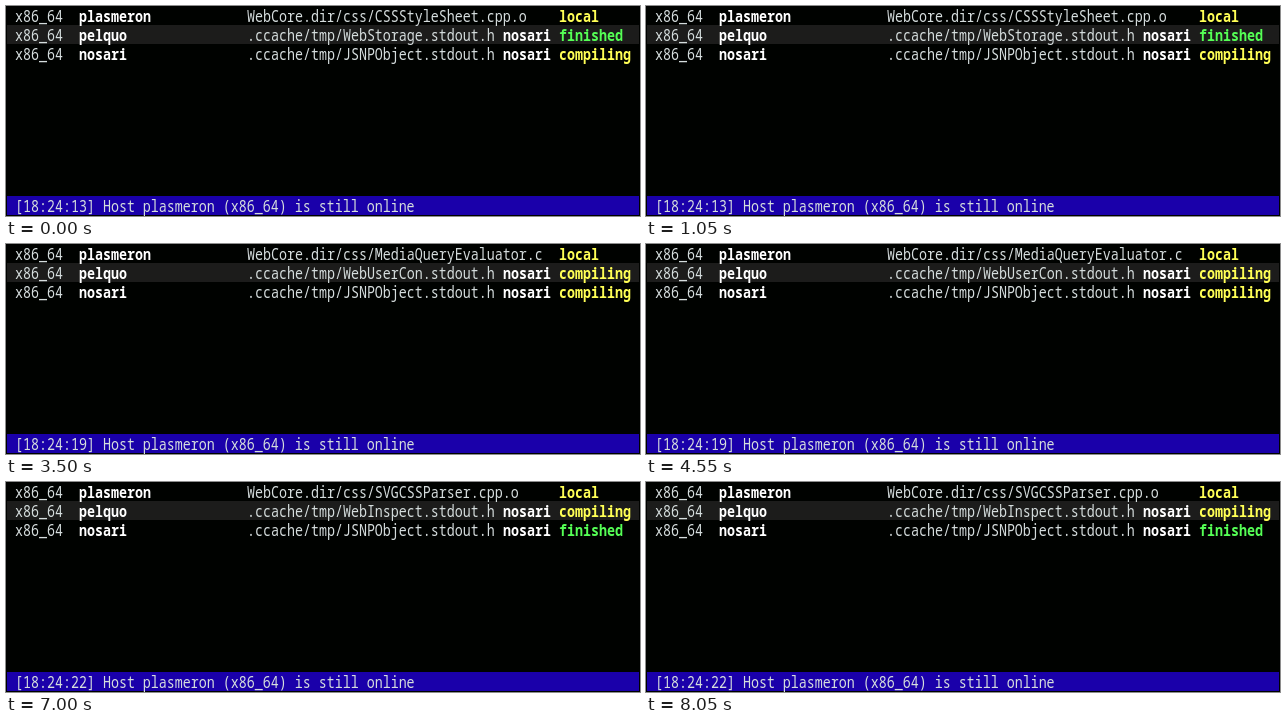
Animation, 634 px wide and 210 px high, one loop 8750 ms. Source, as an HTML page:

```html
<!DOCTYPE html>
<html lang="en">
<head>
<meta charset="utf-8">
<title>Compile monitor</title>
<style>
html, body { margin: 0; width: 100%; height: 100%; overflow: hidden; background: #000200; }
svg { display: block; width: 100%; height: 100%; }
text { font: 16.667px "Noto Sans Mono", "DejaVu Sans Mono", monospace; fill: #d5dddd; white-space: pre; }
.strong { font-weight: 700; fill: #fff; }
.local, .compiling { font-weight: 700; fill: #ffff55; }
.finished { font-weight: 700; fill: #55ff55; }
</style>
</head>
<body>
<svg viewBox="0 0 634 210">
  <rect width="634" height="210" fill="#000200"/>
  <rect x="1" y="19" width="632" height="19" fill="#1c1c1b"/>
  <rect x="1" y="190" width="632" height="19" fill="#1a00aa"/>
  <!-- condensed terminal face: 8px cells -->
  <g id="screen" transform="translate(1 0) scale(.8 1)"></g>
</svg>
<script>
const STEP = 1750, CELL = 10, LINE = 19, BASELINE = 16;
const hosts = ["plasmeron", "pelquo", "nosari"];
const screenGroup = document.getElementById("screen");

const css = name => "WebCore.dir/css/" + name;
const cache = name => `.ccache/tmp/${name}.stdout.h`;

// Each job is [file, status]; cached files are built on the last host.
const states = [
  ["18:24:13", [css("CSSStyleSheet.cpp.o"), "local"], [cache("WebStorage"), "finished"], [cache("JSNPObject"), "compiling"]],
  ["18:24:13", [css("CSSComputedStyleDecla"), "finished"], [cache("WebContext"), "compiling"], [cache("JSNPObject"), "compiling"]],
  ["18:24:19", [css("MediaQueryEvaluator.c"), "local"], [cache("WebUserCon"), "compiling"], [cache("JSNPObject"), "compiling"]],
  ["18:24:19", [cache("WebColorCh"), "compiling"], [cache("WebDeviceP"), "compiling"], [cache("JSNPObject"), "compiling"]],
  ["18:24:22", [css("SVGCSSParser.cpp.o"), "local"], [cache("WebInspect"), "compiling"], [cache("JSNPObject"), "finished"]]
];

function addText(column, row, content = "", style = "") {
  const node = document.createElementNS("http://www.w3.org/2000/svg", "text");
  node.setAttribute("x", column * CELL);
  node.setAttribute("y", row * LINE + BASELINE);
  node.setAttribute("class", style);
  node.textContent = content;
  screenGroup.append(node);
  return node;
}

const rows = hosts.map((host, row) => {
  addText(1, row, "x86_64");
  addText(9, row, host, "strong");
  return {
    file: addText(30, row),
    worker: addText(62, row, "", "strong"),
    status: addText(69, row)
  };
});
const log = addText(1, 10);

let shown = -1;
function render(time) {
  const index = Math.floor(time / STEP) % states.length;
  if (index === shown) return;
  shown = index;
  const [clock, ...jobs] = states[index];
  jobs.forEach(([file, status], i) => {
    const row = rows[i];
    row.file.textContent = file;
    row.worker.textContent = file.startsWith(".ccache") ? hosts[2] : "";
    row.status.textContent = status;
    row.status.setAttribute("class", status);
  });
  log.textContent = `[${clock}] Host ${hosts[0]} (x86_64) is still online`;
}

const start = performance.now();
function tick() {
  render(performance.now() - start);
  requestAnimationFrame(tick);
}
tick();
</script>
</body>
</html>
```
